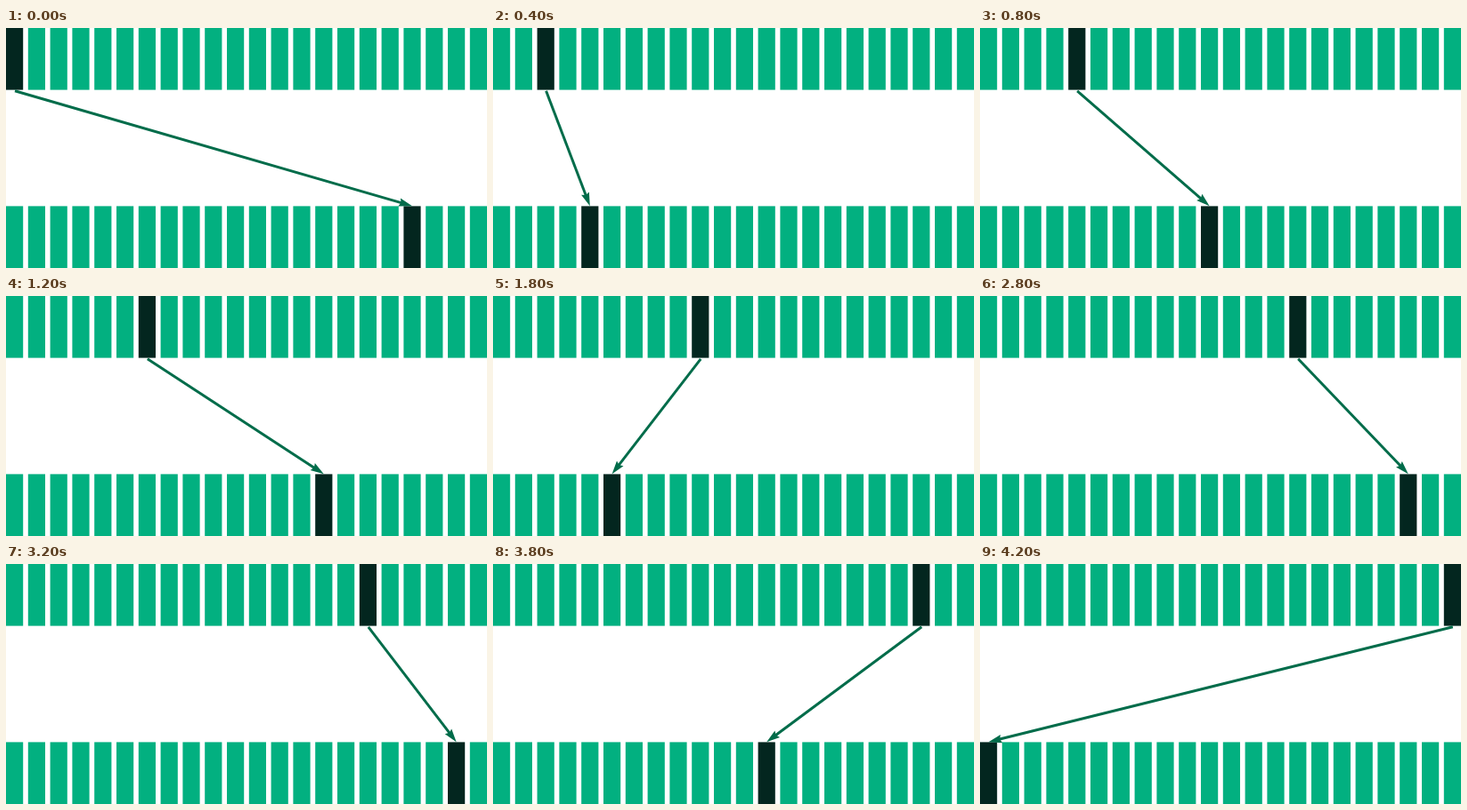
An HTML page with a canvas for the animation above (4400 ms loop, 540x270 px).

```html
<!DOCTYPE html>
<html lang="en">
<head>
<meta charset="utf-8">
<title>Permutation by powers of 19 modulo 23</title>
<style>
  html, body { margin: 0; width: 100%; height: 100%; overflow: hidden; background: #fff; }
  canvas { display: block; }
</style>
</head>
<body>
<canvas width="540" height="270"></canvas>
<script>
const ctx = document.querySelector('canvas').getContext('2d');
const COUNT = 22, STEP = 200, PITCH = 24.8, BAR = 19.2, ROW = 69.6;
const GREEN = '#02b080', DARK = '#03261f', ARROW = '#006c4a';

// Bar i maps to 19^(i+1) mod 23, counted from zero.
const targets = [];
for (let i = 0, power = 1; i < COUNT; i++) {
  power = power * 19 % 23;
  targets.push(power - 1);
}

const center = i => i * PITCH + BAR / 2;

function drawRow(y, active) {
  for (let i = 0; i < COUNT; i++) {
    ctx.fillStyle = i === active ? DARK : GREEN;
    ctx.fillRect(i * PITCH, y, BAR, ROW);
  }
}

function drawArrow(x1, y1, x2, y2) {
  const length = Math.hypot(x2 - x1, y2 - y1);
  ctx.save();
  ctx.translate(x2, y2);
  ctx.rotate(Math.atan2(y2 - y1, x2 - x1));
  ctx.fillStyle = ARROW;
  ctx.fillRect(-length, -1.5, length - 12, 3);
  ctx.beginPath();
  ctx.moveTo(0, 0);
  ctx.lineTo(-15, -4.7);
  ctx.lineTo(-13, 0);
  ctx.lineTo(-15, 4.7);
  ctx.fill();
  ctx.restore();
}

function draw() {
  const from = Math.floor(performance.now() / STEP) % COUNT;
  const to = targets[from];
  ctx.fillStyle = '#fff';
  ctx.fillRect(0, 0, 540, 270);
  drawRow(0, from);
  drawRow(270 - ROW, to);
  drawArrow(center(from) + 0.4, 70.8, center(to), 200.2);
  requestAnimationFrame(draw);
}
draw();
</script>
</body>
</html>
```
